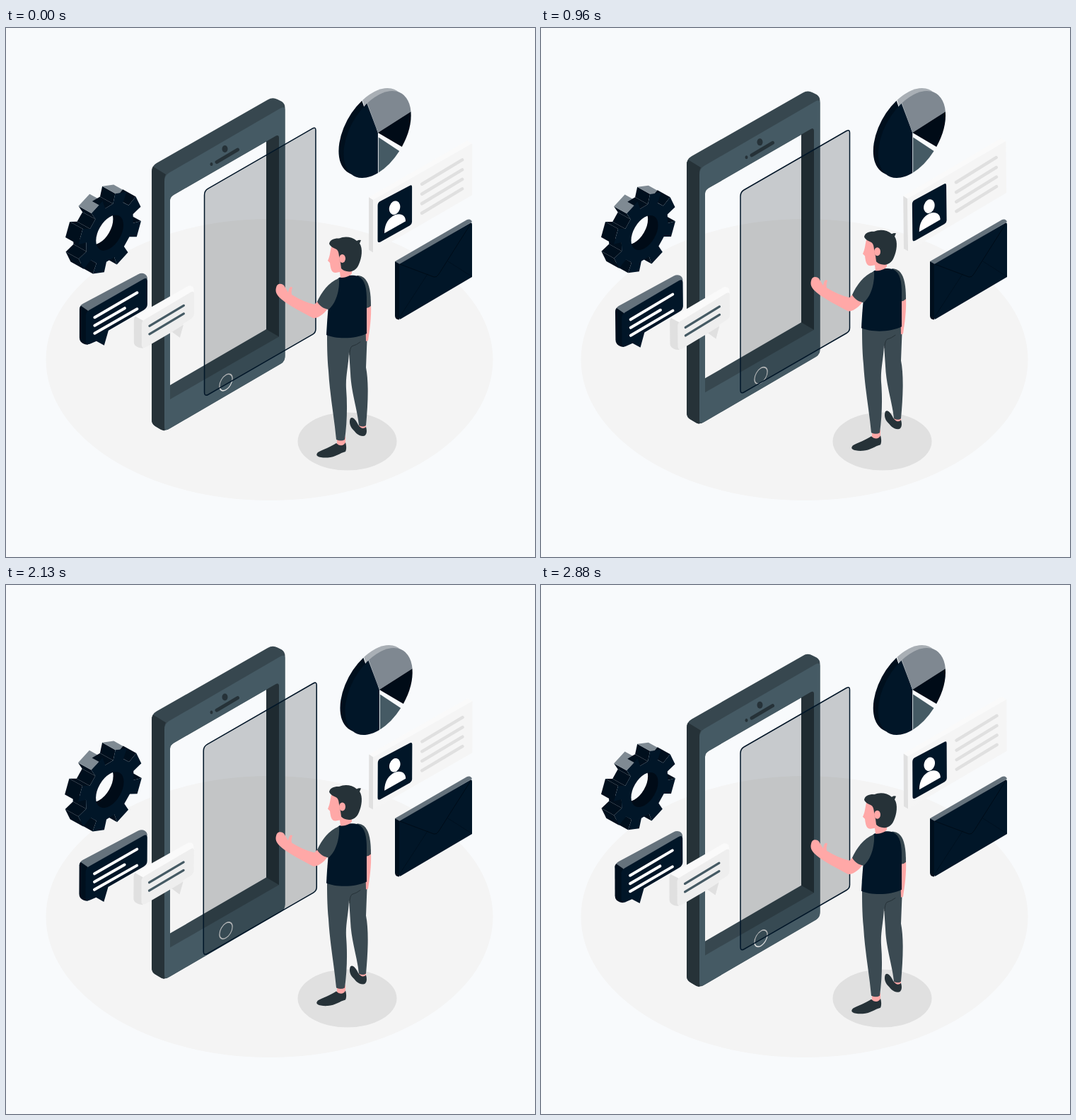
Animation, 748 px wide and 748 px high, one loop 2930 ms. Source, as an HTML page:

```html
<!DOCTYPE html>
<html lang="en">
<head>
<meta charset="utf-8">
<title>Floating interface</title>
<style>
html, body { margin: 0; width: 100%; height: 100%; overflow: hidden; background: #f8fafc }
svg { display: block; width: 100%; height: 100% }
.navy { fill: #011628 }
.dark { fill: #263238 }
.mid { fill: #37474f }
.slate { fill: #455a64 }
.skin { fill: #ffa8a7 }
.line { fill: none; stroke-linecap: round }
.open { fill-rule: evenodd }
</style>
</head>
<body>
<svg viewBox="0 0 748 748">
  <ellipse cx="372.5" cy="469" rx="316" ry="199" fill="#f4f4f4"/>
  <ellipse cx="482.5" cy="584.5" rx="70" ry="41" fill="#e0e0e0"/>

  <!-- envelope -->
  <path fill="#65727c" d="M550 330 L652 271 Q657 269 659 274 L556 335Z"/>
  <path fill="#000f1d" d="M550 330 L556 333.500 V412.500 Q550 412 550 407Z"/>
  <path class="navy" d="M556 334 L656 276 Q659 274 659 278 V352 L558 411.500 Q556 412.500 556 410Z"/>
  <path class="line" stroke="#000a14" stroke-width=".8" d="M557 334 L605 352 Q609 353 612 348 L657 277"/>
  <path class="line" stroke="#000a14" stroke-width=".4" d="M557 408 L596 348 M658 351 L625 330"/>

  <g id="pie">
    <g transform="matrix(.866 -.5 0 1 518 146.500)">
      <path fill="#000f1d" d="M0 0 V55 A55 55 0 0 1 -17 -52.300Z"/>
      <path fill="#a9afb5" d="M0 0 L-16 -52.600 A55 55 0 0 1 54.800 -4.800Z"/>
    </g>
    <g transform="matrix(.866 -.5 0 1 525 150.500)">
      <path class="navy" d="M1 -2 L1 55 A55 55 0 0 1 -17 -52.300Z"/>
      <path fill="#7f8891" d="M1 -2 L-16 -52.600 A55 55 0 0 1 54.800 -4.800Z"/>
      <path fill="#000b17" d="M1 -2 L54.800 -4.800 A55 55 0 0 1 40.200 37.500Z"/>
      <path class="slate" d="M2 5 L36 41.600 A55 55 0 0 1 2 55Z"/>
    </g>
  </g>

  <g id="gear"></g>

  <g id="phone">
    <path class="mid open" d="M206 203 Q206 195 213 191 L370 101.500 Q377 97 384 101 L390 104 Q394.500 107 394.500 113 V464 Q394.500 471 389 474.500 L232 566 Q224 572 216 566 L211 563 Q206 560 206 554Z M232 244 Q232 239 237 236 L368 160.500 V426 L232 505Z"/>
    <path class="dark" d="M206 203 Q206 199 208 196 L226 207 Q224 210 224 216 V569.500 Q220 569 216 566 L211 563 Q206 560 206 554Z"/>
    <path class="slate open" d="M224 217 Q224 208.500 231 204.500 L388 113.500 Q394.500 110 394.500 116 V464 Q394.500 471 389 474.500 L232 566 Q224 571 224 563Z M232 244 Q232 239 237 236 L381 153 Q386 150 386 156 V436.500 L232 525Z"/>
    <path class="dark" d="M368 160.500 L381 153 Q386 150 386 156 V436.500 L368 426Z"/>
    <g class="dark">
      <ellipse cx="309.500" cy="171" rx="4" ry="5"/>
      <ellipse cx="290.500" cy="192.500" rx="2" ry="2.500"/>
    </g>
    <path class="line" stroke="#263238" stroke-width="5" d="M298 189.500 L327.500 172"/>
    <circle class="line" r="10.500" stroke="#e0e0e0" stroke-width="1.500" transform="matrix(.866 -.5 0 1 311 501)"/>
  </g>

  <path id="glass" fill="#000a10" fill-opacity=".2" stroke="#011628" stroke-width="1.500" d="M282 238 Q282 232 287 229 L432 145.500 Q436.500 143 436.500 148 V424 Q436.500 429 432 431.500 L287 515 Q282 517.500 282 512Z"/>

  <g id="cards">
    <!-- profile card -->
    <path fill="#fafafa" d="M513 239 L652 159 L659 163 L519 243Z"/>
    <path fill="#e0e0e0" d="M513 239 L519 243 V317 L513 313.500Z"/>
    <path fill="#f5f5f5" d="M519 243 L659 163 V236 L519 317Z"/>
    <path class="navy" d="M525.500 251 Q525.500 247 528.500 245 L571 222.500 Q574 221 574 224.500 V274 Q574 277 571 279 L529 302.500 Q525.500 304 525.500 300Z"/>
    <ellipse cx="549.500" cy="254" rx="7.500" ry="10" fill="#fff" transform="rotate(18 549.500 254)"/>
    <path fill="#fff" d="M535 290 C535 277 541 268 550 264 C559 261 565 265 565 273Z"/>
    <path class="line" stroke="#e0e0e0" stroke-width="4.500" d="M588 220.500 L645 186 m-57 48.500 L645 200 m-57 48 L645 213.500 m-57 48 L645 227"/>

    <!-- dark speech bubble -->
    <path fill="#65727c" d="M104 398 Q104 393 109 390 L187 348.500 Q192 346 196 348 Q200 350 200 355 L114 404Z"/>
    <path fill="#000f1d" d="M104 398 Q104 395 106 393 L116 400 V448 Q110 448 106 444 Q104 442 104 438Z"/>
    <path class="navy" d="M113 407 Q113 402 118 399 L194 355.500 Q200 352 200 358 V391 Q200 396 195 399 L145 428 L139 449 L128 443 L120 446.500 Q113 450 113 443Z"/>
    <path class="line" stroke="#fff" stroke-width="4" d="M125.500 409.500 L185.500 374.500 M125.500 421 L168 396.500 M125.500 432 L185.500 397.500"/>

    <!-- light speech bubble -->
    <path fill="#fafafa" d="M181 413 Q181 409 186 406 L256 366 Q261 363 265 367 L266 374 L193 417Z"/>
    <path fill="#e0e0e0" d="M181 413 Q181 410 183 408 L194 414 V453 Q188 453 184 450 Q181 448 181 444Z"/>
    <path fill="#eee" d="M192 419 Q192 415 197 412 L261 374 Q266 371 266 376 V404 Q266 409 261 412 L251 418 L246 438 L235 430 L199 451 Q192 455 192 448Z"/>
    <path fill="#e0e0e0" d="M235 430 L251 420 L246 438Z"/>
    <path class="line" stroke="#455a64" stroke-width="3.200" d="M203 421.500 L251.500 392.500 M203 433 L251.500 404"/>
  </g>

  <g id="man">
    <path class="skin" d="M499 560 L509 560 L509 568 Q504 570 499 565Z M468 578 L480 578 L480 590 Q474 596 468 591Z"/>
    <path class="dark" d="M487 552 C490 549 494 553 498 561 C502 567 506 567 509 564 C511 570 510 577 505 577 C497 577 494 571 489 566 C486 562 485 556 487 552Z"/>
    <path class="dark" d="M467 587 C460 592 448 596 441 600 C436 605 442 608 455 607.500 C466 607 472 601 480 599 C482 595 481 589 480 586 C477 592 471 591 467 587Z"/>
    <path fill="#3b4a52" d="M454 428 L511 428 L509 480 C513 500 512 530 509 562 Q505 565 499 562 C497 540 488 515 487 488 L485 458 C484 480 480 492 481 510 C483 535 482 560 479 582 Q474 585 467 582 C464 550 458 520 456 485 C454 465 454 445 454 428Z"/>
    <path class="line" stroke="#263238" d="M486 462 Q486 453 489 450 Q496 448 501 444"/>
    <path class="skin" d="M508 392 L516 390 C517 410 514 428 512 442 L509 443Z"/>
    <path class="mid" d="M496 350 C511 350 516 365 516 393 Q512 397 507 396Z"/>
    <path class="skin" d="M441 386 L436 391 Q420 387 404 377 C403 373 404 370 405 367 C402 364 400 368 399 374 L393 364 C389 360 383 361 382 367 C380 374 384 379 390 384 C400 392 420 403 434 410 C441 412 452 402 456 395Z"/>
    <path class="navy" d="M471 353 C482 349 491 349 498 351 C508 356 510 368 510 385 L510 432 C495 440 466 440 453 434 C454 415 455 400 457 385 C459 370 464 358 471 353Z"/>
    <path class="mid" d="M471 354 C456 359 446 374 440 387 C444 394 450 397 456 398 C466 390 472 372 471 354Z"/>
    <path class="skin" d="M460 309 C458 318 458 323 455 329 L458 332 C459 340 460 346 466 346 L472 345 L473 353 C480 353 486 351 489 347 L490 320Z"/>
    <path class="dark" d="M457 305 C458 299 465 297 471 297.500 C479 294 489 295 496 301 Q499 299 502 300 L500 304.500 C505 312 503 325 499 334 C496 342 490 344.500 485 344.500 C480 344 477 343 474 340 L473 332 C470 325 472 318 468 313.500 C464 311 459 310 457 305Z"/>
    <ellipse class="skin" cx="475.500" cy="326" rx="4.500" ry="6"/>
  </g>
</svg>
<script>
const $ = id => document.getElementById(id);
const place = (id, value) => $(id).setAttribute('transform', value);

function buildGear() {
  const cx = 146.5, cy = 289.5, dx = -18, dy = -10;
  const iso = (r, deg) => {
    const a = deg * Math.PI / 180, u = r * Math.cos(a) * .866;
    return [cx + u, cy - u * .577 + r * Math.sin(a)];
  };
  const rim = [];
  for (let a = 21; a < 381; a += 45)
    rim.push(iso(38, a - 13), iso(51, a - 11), iso(51, a + 11), iso(38, a + 13));
  let html = '';
  rim.forEach(([x, y], i) => {
    const [x2, y2] = rim[(i + 1) % rim.length];
    if ((y2 - y) * dx - (x2 - x) * dy <= 0) return;
    const tipUp = i % 4 == 1 && x2 - x > 8;
    html += `<path fill="${tipUp ? '#7f8a93' : '#000f1d'}" d="M${x} ${y}L${x2} ${y2}l${dx} ${dy}L${x + dx} ${y + dy}Z"/>`;
  });
  const hole = (fill, x, y) =>
    `<circle r="22" fill="${fill}" transform="matrix(.866 -.5 0 1 ${x} ${y})"/>`;
  $('gear').innerHTML = html + `<path class="navy" d="M${rim.join('L')}Z"/>` +
    `<clipPath id="hole">${hole('#000', cx, cy)}</clipPath>` + hole('#000b17', cx, cy) +
    `<g clip-path="url(#hole)">${hole('#f8fafc', cx + dx * .8, cy + dy * .8)}</g>`;
}

// Linear interpolation through [position, value] pairs
function tween(p, keys) {
  const i = keys.findIndex(k => k[0] > p), [a, x] = keys[i - 1], [b, y] = keys[i];
  return x + (y - x) * (p - a) / (b - a);
}
const float = [[0, 0], [.5, -14.96], [1, 0]];
const beat = [[0, 1], [.1, 1.1], [.3, 1], [.4, 1], [.5, 1.1], [.6, 1], [1, 1]];
const wind = [[0, 0], [.25, 1], [.75, -1], [1, 0]];
const shake = [0, -1, 2, -4, 4, -4, 4, -4, 2, -1, 0].map((x, i) => [i / 10, x * 1.496]);

const scaleAt = (s, x, y) => `translate(${x} ${y}) scale(${s}) translate(${-x} ${-y})`;

function draw(now) {
  const step = Math.floor((now % 2930 + 4) * .024);   // 24 steps a second
  const p = (step / 24 * 1000 + 28) % 1500 / 1500;
  const rise = `translate(0 ${tween(p, float) + .6})`, s = tween(p, beat);
  place('phone', rise);
  place('man', rise);
  place('glass', scaleAt(s, 359.2, 330));
  place('gear', scaleAt(s, 138, 283.5));
  place('pie', `translate(${tween(p, shake) + .3} 0)`);
  place('cards', `rotate(${tween(p, wind)} 381 310)`);
}

buildGear();
const start = performance.now();
(function loop() {
  draw(performance.now() - start);
  requestAnimationFrame(loop);
})();
</script>
</body>
</html>
```
